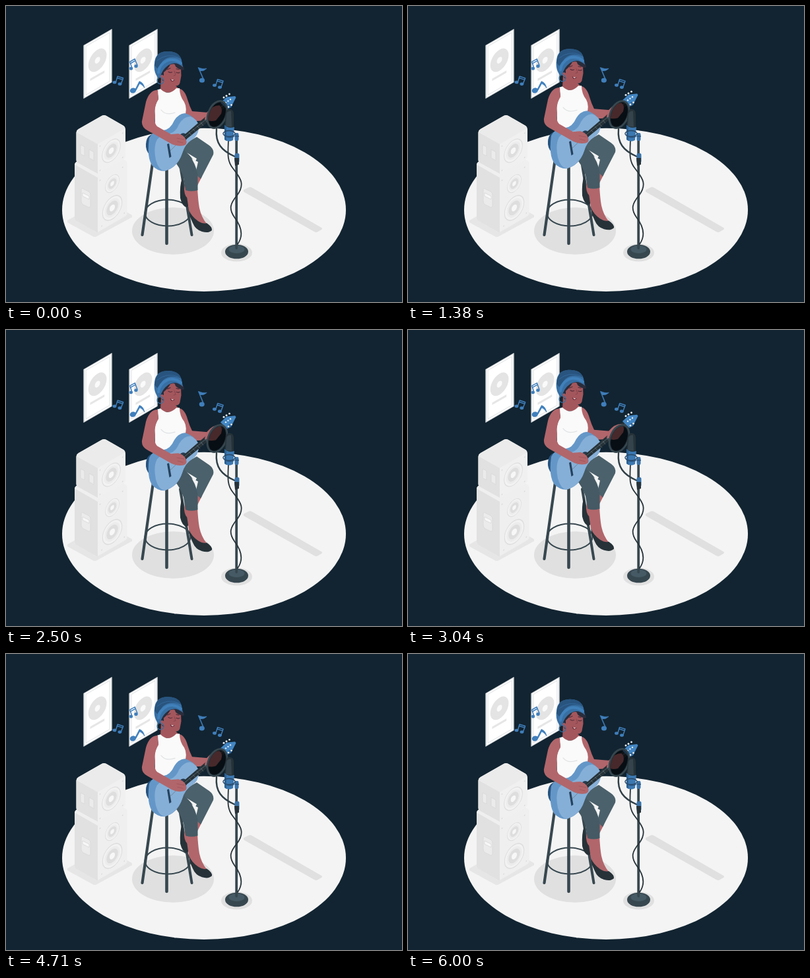
Recreate the animation shown at these times as an HTML page. Size 600 px wide and 450 px high, loop 6040 ms.

```html
<!DOCTYPE html>
<html lang="en">
<head>
<meta charset="utf-8">
<title>Guitarist</title>
<style>
html, body { margin: 0; width: 100%; height: 100%; overflow: hidden; background: #122431; }
svg { display: block; width: 100vw; height: 100vh; }
.line { fill: none; stroke-linecap: round; stroke-linejoin: round; }
.skin { fill: #b1666b; }
.face { fill: #a3575d; }
.shoe { fill: #263238; }
.note { fill: #407fbc; stroke: #407fbc; stroke-width: 1.5; stroke-linejoin: round; }
</style>
</head>
<body>
<svg viewBox="0 0 600 450" xmlns="http://www.w3.org/2000/svg">
  <defs>
    <!-- wall record, in the plane of the wall -->
    <g id="record">
      <path d="M0 0H48.5V80H0Z" fill="#fff" stroke="#dfe1e3" stroke-width="1.2"/>
      <path d="M.4 0V80M48.2 0V80" stroke="#d2d6d9" stroke-width="1.6"/>
      <path d="M3.5 3H45V77H3.5Z" fill="none" stroke="#d3d7d9" stroke-width=".7"/>
      <circle cx="23.8" cy="34.3" r="16" fill="#e4e4e4"/>
      <circle cx="23.8" cy="34.3" r="4.6" fill="#fafafa"/>
      <path d="M11 56H36V59.5H11Z" fill="#e6e6e6"/>
    </g>
    <g id="cone">
      <circle r="16" fill="#f2f2f2" stroke="#dedede" stroke-width="1.2"/>
      <circle r="12.5" fill="#ececec"/>
      <circle r="9.5" fill="#dedede"/>
      <circle r="4.4" fill="#f7f7f7"/>
    </g>
    <g id="screws" fill="#dadada">
      <circle cx="4" cy="5" r="1"/><circle cx="43.5" cy="5" r="1"/>
    </g>
  </defs>

  <ellipse cx="300" cy="309.9" rx="215" ry="124.1" fill="#f4f4f4"/>
  <path d="M361 279 368 275.6Q370 274.6 372 275.8L478 337Q480 338.5 478 340L472 343.5Q470 344.5 467 343L361 283Q358.5 281 361 279Z" fill="#e0e0e0"/>
  <ellipse cx="253" cy="342" rx="62" ry="35.8" fill="#e0e0e0"/>
  <ellipse cx="349.5" cy="375" rx="23.5" ry="13.6" fill="#e0e0e0"/>

  <use href="#record" transform="matrix(.866 -.5 0 1 118 60)"/>
  <use href="#record" transform="matrix(.866 -.5 0 1 187 60)"/>

  <!-- speakers: silhouette first, then the darker faces -->
  <path d="M93 326 150 294 191 318V321L136 351H133L93 329Z" fill="#e6e6e6"/>
  <path d="M104 241Q104 238 108 236L146 214 181 235Q183.5 236 183.5 239V315Q183.5 318 180 320L139 344V345L107 327Q104 325 104 321Z" fill="#efefef"/>
  <path d="M104 241 139 261V345L107 327Q104 325 104 321Z" fill="#e1e1e1"/>
  <path d="M106.500 193Q106.500 189 110 187L145 167Q148.500 165 152 167L178 182Q181 184 181 188V228Q181 231 178 233L139 255 110 239Q106.500 237 106.500 234Z" fill="#f0f0f0"/>
  <path d="M107 191Q107 189 110 187L145 167Q148.500 165 152 167L178 182Q180 183.500 180 186L139 210Z" fill="#ebebeb"/>
  <path d="M106.500 191.500 139 210V255L110 239Q106.500 237 106.500 234Z" fill="#e1e1e1"/>
  <g transform="matrix(.866 -.5 0 1 139 210)">
    <use href="#screws"/><use href="#screws" y="37"/>
    <use href="#screws" y="52"/><use href="#screws" x="3" y="123"/>
  </g>
  <use href="#cone" transform="matrix(.866 -.5 0 1 159.500 220)"/>
  <use href="#cone" transform="matrix(.66 -.381 0 .762 161 270)"/>
  <use href="#cone" transform="matrix(.92 -.531 0 1.062 161 307)"/>
  <g fill="#ebebeb" stroke="#d7d7d7" stroke-width=".8">
    <path d="M113 211 119 214V228L113 225ZM126 218 133 222V235L126 231Z"/>
    <path d="M114 279Q114 276 117 278L125 282Q128 284 128 287V304Q128 307 125 306L117 302Q114 300 114 297Z"/>
    <path d="M116 284 126 289V294L116 289Z" fill="#f7f7f7"/>
  </g>

  <!-- stool -->
  <g class="line" stroke="#37474f">
    <path d="M264 242 281.500 348" stroke-width="4"/>
    <ellipse cx="245" cy="314.500" rx="34.500" ry="20" stroke-width="2"/>
    <path d="M223 232 206.500 348" stroke-width="4.200"/>
    <path d="M243.500 232V361" stroke-width="4.600"/>
  </g>

  <g id="player">
    <!-- far leg -->
    <path class="skin" d="M290 250 297 259 277 299Q270 301 268 293L271 270Z"/>
    <path class="shoe" d="M267 262Q263 272 264 292Q267 305 274 306Q279 303 277 293Q271 291 270 280Z"/>
    <path d="M266 212 289 199 308 212Q316 218 314 226L295 263 287 255 291 237 268 226Z" fill="#4b616b"/>
    <!-- near leg -->
    <path class="skin" d="M272 276H290Q291 296 293 307Q296 321 304 331Q299 337 289 330Q279 320 277 310Z"/>
    <path class="shoe" d="M277 310Q281 320 291 327Q299 332 304 330Q313 336 312 341Q307 346 297 343Q287 340 283 330L279 321Z"/>
    <path d="M255 236 264 214 277 226Q288 240 290.500 257V280Q281 283 272 280L269 261Q264 246 255 236Z" fill="#455a64"/>
    <path d="M274 223 289 232 286 238Q281 229 274 223Z" fill="#f4f4f4"/>
    <!-- far arm, neck and vest -->
    <path class="skin" d="M261 125Q271 127 275 142Q278 152 282 160L306 162 312 174 285 175 270 166Z"/>
    <path class="face" d="M235 107H257L256 120 261 125Q250 137 234 128Z"/>
    <path d="M229 127.500 234 126Q246 138 258 125L263 125Q263 137 270 146Q275 155 271 167L266 200H226Q226 172 225 158Q226 149 231 141Z" fill="#fafafa"/>
    <path class="line" d="M235 158Q242 167 256 162" stroke="#dfe2e4" stroke-width="1.200"/>

    <!-- guitar -->
    <path d="M224 194Q211 197 212 214Q213 224 222 229L233 210Z" fill="#28547f"/>
    <path d="M217 201Q223 189 238 189Q249 188 255 174Q261 164 271 163Q283 166 291 178Q294 194 283 202Q270 210 267 224Q260 246 240 251Q229 251 221 242Q213 229 217 201Z" fill="#6497c8"/>
    <path d="M229 203Q236 194 248 194Q257 192 262 180Q269 168 279 168Q290 171 292 184Q292 197 282 203Q271 210 267 224Q260 245 240 251Q231 249 227 234Q223 214 229 203Z" fill="#86afd7"/>
    <ellipse cx="268" cy="200" rx="6" ry="7" transform="rotate(25 268 200)" fill="#263c50"/>
    <path d="M244 210 247 209 250.500 229 247.500 231Z" fill="#24425e"/>
    <path d="M263 202 326 148 333 154 269 206Z" fill="#263238"/>
    <path class="line" d="M266 203 329 151M249 220 266 203" stroke="#667780" stroke-width=".7"/>
    <path d="M277 192 282 197M283 187 288 192M289 182 294 187M295 177 299 182M301 172 305 177" stroke="#72818a" stroke-width=".6"/>
    <path class="skin" d="M304 162Q313 151 323 151Q329 155 326 164L318 174Q309 177 301 172Z"/>
    <path d="M325 147 334 138.500 347 137 348.500 139 341 154 335 157Z" fill="#4386c3"/>
    <path d="M335 157 341 154 344 148 336 151Z" fill="#2e659a"/>
    <g fill="#e8f0f6">
      <circle cx="330" cy="139" r="1.500"/><circle cx="334" cy="136.500" r="1.500"/><circle cx="338.500" cy="134" r="1.400"/>
      <circle cx="333" cy="147" r="1.200"/><circle cx="336.500" cy="144.500" r="1.200"/><circle cx="340" cy="142" r="1.200"/>
      <circle cx="337" cy="153.500" r="1.400"/><circle cx="341.500" cy="150.500" r="1.400"/>
    </g>

    <!-- near arm -->
    <path class="skin" d="M230 127.500Q217 128 212 146L206 175Q205 184 214 189L246 207Q258 215 270 212Q276 209 272 202Q269 196 261 194L250 195 229 183Q224 178 226 167Q224 152 231 142Z"/>
    <path class="line" d="M259 201 270 203M260 206 268 208" stroke="#994f57" stroke-width=".7"/>

    <!-- head -->
    <path d="M230 91 259 84Q270 88 270 97L262 98 238 114Q231 108 230 91Z" fill="#292d3c"/>
    <path class="face" d="M239 101Q246 95 249 89Q257 86 265 94L265.500 106 263.500 117Q262 122 255 121.500Q246 121 240 113L237 112Q233 110 234 106Q236 103 239 106Z"/>
    <path d="M255 87Q265 88 270 97Q263 98 257 92Z" fill="#292d3c"/>
    <path d="M230 109Q223 99 225 87Q226 70 243 69Q262 68 266 82L268 93Q257 83 246 90Q236 97 234 108Z" fill="#386fa3"/>
    <path d="M225 90Q226 70 243 69Q261 68 265 80Q249 74 238 83L229 95Z" fill="#28547f"/>
    <path class="line" d="M231 101Q232 89 244 83Q255 79 265 87" stroke="#4080ba" stroke-width="4"/>
    <path class="line" d="M229 83Q243 71 262 78" stroke="#34689a" stroke-width="1"/>
    <circle class="line" cx="234" cy="113.500" r="5" stroke="#386f9f" stroke-width="1.200"/>
    <g class="line" stroke="#502d38" stroke-width="1.100">
      <path d="M244.500 96.500 249 94.500M258 95.500 262 96.500M246 100Q249 102 251.500 100.500M258 101Q261 102.500 263 101"/>
      <path d="M255 99 257 105 254 106" stroke="#824049" stroke-width=".8"/>
    </g>
    <path d="M248.500 110.500Q252 113 256 112Q253 116 250 114Z" fill="#71303c"/>
    <path d="M250 111.500 254.500 112.500 252 113.500Z" fill="#f8eeee"/>
  </g>

  <!-- microphone stand -->
  <ellipse cx="349.500" cy="373.500" rx="17.500" ry="10.800" fill="#37474f"/>
  <ellipse cx="349.500" cy="370" rx="12" ry="6" fill="#455a64"/>
  <g class="line">
    <path d="M349.200 196V368" stroke="#37474f" stroke-width="3.800"/>
    <path d="M337 204C336 226 335 236 344 247C355 261 363 271 350 288C340 300 337 308 346 321C356 334 361 348 351 362" stroke="#263238" stroke-width="1.800"/>
    <path d="M319 187C317 208 326 220 347 229" stroke="#303f47" stroke-width="2.400"/>
  </g>
  <g transform="rotate(22 320 165)">
    <ellipse cx="320" cy="165" rx="13.500" ry="21.500" fill="#000" fill-opacity=".6" stroke="#37474f" stroke-width="3"/>
    <ellipse cx="320" cy="165" rx="12" ry="20" fill="none" stroke="#202e35" stroke-width=".8"/>
  </g>
  <rect x="346.500" y="224" width="7" height="14" rx="2" fill="#3a72a8"/>
  <path d="M346 231H353V241L347 243Z" fill="#263238"/>
  <rect x="346.500" y="193" width="6" height="12" rx="2" fill="#3a72a8"/>
  <path d="M347 198H353" stroke="#28547f" stroke-width="1.500"/>
  <path d="M333 162Q334 156 340 157Q345 158 345 164V187L331 185Z" fill="#263238"/>
  <path d="M334 164Q336 159 341 160L342 184 333 183Z" fill="#35444c"/>
  <path d="M331 181Q337 187 346 184L344 204Q337 208 331 203Z" fill="#3c78b1"/>
  <path d="M331 181 334 183V205L331 203Z" fill="#2d6192"/>
  <ellipse class="line" cx="338" cy="194" rx="9" ry="4.500" stroke="#294764" stroke-width="1.500"/>
  <path class="line" d="M331 197Q338 202 346 198" stroke="#28547f" stroke-width="1.300"/>

  <g id="notes" class="note">
    <g>
      <ellipse cx="189.500" cy="95" rx="2" ry="1.700"/><ellipse cx="197" cy="91.500" rx="2" ry="1.700"/>
      <path class="line" d="M191 94 187.500 85 195 80.500 199 90M188.500 87.500 196 83"/>
    </g>
    <g>
      <ellipse cx="164.500" cy="116" rx="2.200" ry="1.600"/><ellipse cx="172.500" cy="118.500" rx="2.200" ry="1.600"/>
      <path class="line" d="M166.500 115.500 169 107 177.500 109.500 174.500 118M168.500 109.500 177 112"/>
    </g>
    <g>
      <ellipse cx="192.500" cy="128.500" rx="4" ry="3.200" transform="rotate(-20 192.500 128.500)"/>
      <path d="M195.500 127.500 202 114.500Q208 116 210 124.500Q206 119 202.500 118L197 128.500Z" stroke-width=".7"/>
    </g>
    <g>
      <ellipse cx="297" cy="113" rx="3.300" ry="2.800"/>
      <path d="M299 112 291 93.500Q298 96.500 304 95Q300 99.500 294 98.500L300 112Z" stroke-width=".7"/>
    </g>
    <g>
      <ellipse cx="316" cy="120.500" rx="2.200" ry="1.600"/><ellipse cx="324" cy="123.500" rx="2.200" ry="1.600"/>
      <path class="line" d="M318 120 320.500 111.500 329 114 326 123M320 114 328 116.500"/>
    </g>
  </g>
</svg>
<script>
const LOOP = 6040, LIFT = 8.3, TILT = 2;
const player = document.getElementById('player');
const notes = [...document.getElementById('notes').children].map(el => {
  const box = el.getBBox();
  return { el, x: box.x + box.width / 2, y: box.y + box.height / 2 };
});

function draw(now) {
  const phase = now % LOOP / LOOP;
  const rise = 1 - Math.abs(1 - 2 * phase);
  player.setAttribute('transform', `translate(0 ${-LIFT * rise})`);
  for (const { el, x, y } of notes) {
    el.setAttribute('transform', `rotate(${TILT * rise} ${x} ${y})`);
  }
  requestAnimationFrame(draw);
}
draw(0);
</script>
</body>
</html>
```
